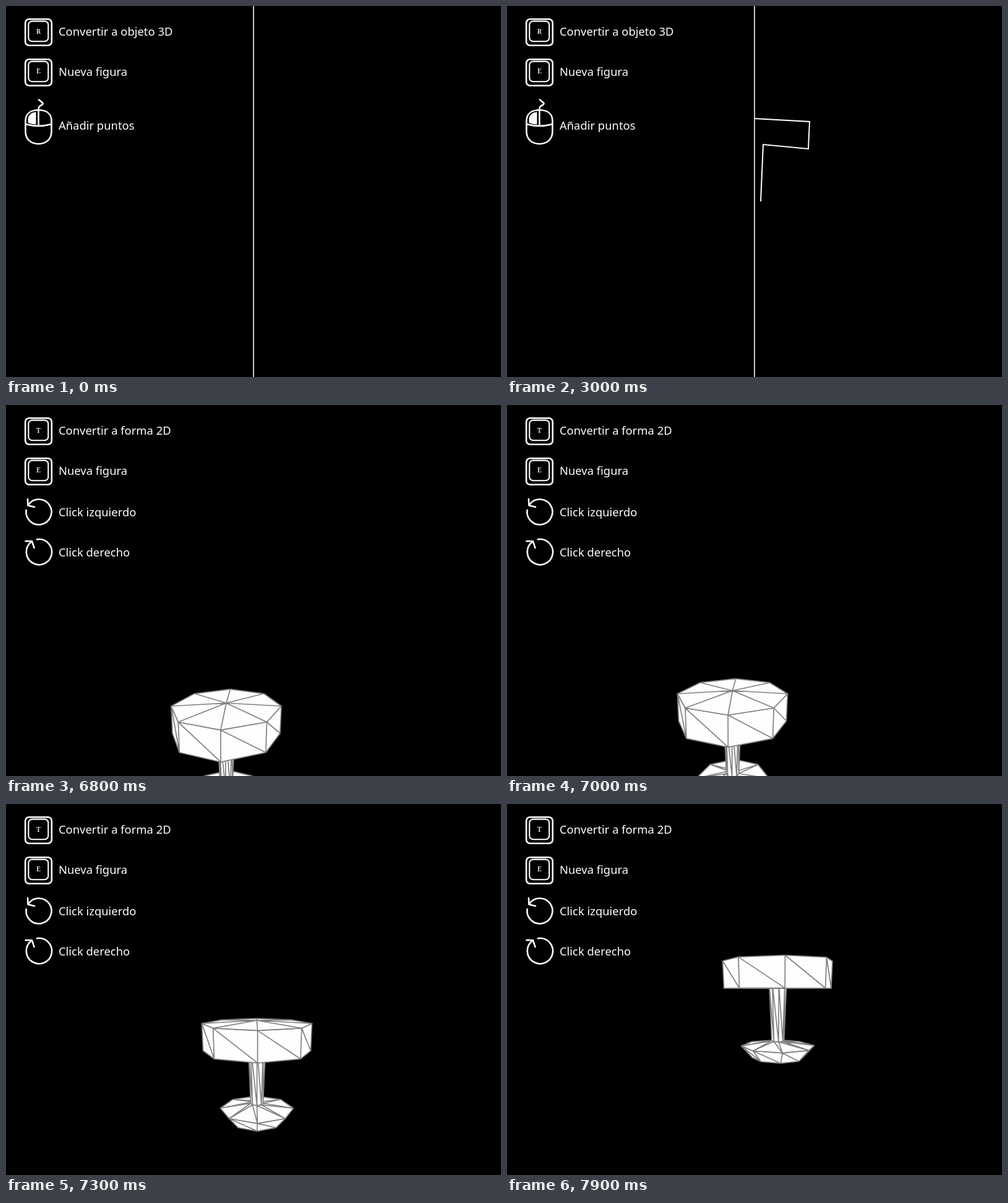
These frames come from a looping animation (800 by 600 pixels, 8000 ms). An HTML page with a canvas:

```html
<!DOCTYPE html>
<html lang="es">
<head>
<meta charset="utf-8">
<title>Sólido de revolución</title>
<style>
  html, body { margin: 0; width: 100%; height: 100%; overflow: hidden; background: #000; }
  svg, canvas { position: absolute; left: 0; top: 0; width: 800px; height: 600px; display: block; }
  text { fill: #fff; font: 18.4px "Noto Sans", sans-serif; }
  .letter { fill: #ddd; font: 600 10.5px "Noto Serif", serif; text-anchor: middle; }
  .icon, #outline { fill: none; stroke: #fff; }
  .icon { stroke-width: 2.6; stroke-linecap: round; stroke-linejoin: round; }
  #outline { stroke-width: 2; stroke-linejoin: miter; }
</style>
</head>
<body>
<canvas id="model" width="800" height="600"></canvas>
<svg viewBox="0 0 800 600">
  <defs>
    <g id="key" class="icon">
      <rect x="31.2" y="21.2" width="42.6" height="42.6" rx="6"/>
      <rect x="36.3" y="24.6" width="32" height="32.6" rx="6" stroke-width="2.1"/>
    </g>
  </defs>

  <use href="#key"/>
  <use href="#key" y="65"/>
  <text class="letter" x="52.5" y="109">E</text>
  <text x="85" y="113">Nueva figura</text>

  <g id="flat">
    <text class="letter" x="52.5" y="44.5">R</text>
    <text x="85" y="48">Convertir a objeto 3D</text>
    <text x="85" y="200">Añadir puntos</text>
    <g class="icon" stroke-width="3">
      <path d="M31.5 186C31.5 174 40 168.3 52.5 168.3S73.5 174 73.5 186V203C73.5 216 64 223 52.5 223S31.5 216 31.5 203Z"/>
      <path d="M31.5 191Q52.5 197 73.5 191M52.5 168V194M53 151.5L59.5 157Q60 159 56 161Q52 163 52.5 168"/>
      <path d="M36.5 188V183Q37.5 174 47.5 172.5V190.5Q41 190 36.5 188Z" fill="#fff" stroke-width="2"/>
    </g>
    <rect x="399" width="2" height="600" fill="#c8c8c8"/>
    <polyline id="outline"/>
  </g>

  <g id="solid">
    <text class="letter" x="52.5" y="44.5">T</text>
    <text x="85" y="48">Convertir a forma 2D</text>
    <text x="85" y="180">Click izquierdo</text>
    <text x="85" y="245">Click derecho</text>
    <path class="icon" d="M36.2 161.2A20.5 20.5 0 1 1 32.7 170M35 152L35.5 162.5L46 165"/>
    <path class="icon" d="M50 217.4A20.6 20.6 0 1 1 41 221.3M31.5 220.3L42 220.3L45.5 231"/>
  </g>
</svg>
<script>
  const LOOP = 8000, STEP = 100, SOLID_START = 6800, TURN_START = 7900;
  const SIDES = 8, EYE = 300 / Math.tan(Math.PI / 6);
  const $ = id => document.getElementById(id);
  const ctx = $('model').getContext('2d');

  // radius from the axis, height on the stage
  const profile = [[0, 182], [89, 187], [87, 231], [14, 224],
                   [10, 316], [59, 324], [41, 343], [0, 342]];
  // when each point of the profile is placed
  const clicks = [500, 500, 500, 2000, 3000, 3700, 4300, 5100];
  // time, axis x, vertical shift
  const path = [[6800, 356, 300], [6900, 358.5, 296], [7000, 364.5, 280],
                [7100, 378, 245], [7300, 405.5, 168], [7500, 422.5, 98],
                [7600, 427, 85], [7900, 437.8, 67]];

  function position(t) {
    const i = Math.min(path.findLastIndex(p => p[0] <= t), path.length - 2);
    const [a, b] = [path[i], path[i + 1]];
    const k = (t - a[0]) / (b[0] - a[0]);
    return [a[1] + (b[1] - a[1]) * k, a[2] + (b[2] - a[2]) * k];
  }

  function project(x, y, z) {
    const k = EYE / (EYE - z);
    return [400 + (x - 400) * k, 300 + (y - 300) * k];
  }

  const isFront = ([a, b, c]) =>
    (b[0] - a[0]) * (c[1] - a[1]) - (b[1] - a[1]) * (c[0] - a[0]) > 0.01;

  function trace(points) {
    points.forEach((p, i) => i ? ctx.lineTo(...p) : ctx.moveTo(...p));
    ctx.closePath();
  }

  function drawSolid(t) {
    const [cx, shift] = position(t);
    const turn = t >= TURN_START ? 0.036 : 0;
    const vertex = ([r, y], j) => {
      const angle = j * 2 * Math.PI / SIDES + turn;
      return project(cx + r * Math.sin(angle), y + shift, r * Math.cos(angle));
    };
    ctx.fillStyle = '#fefefe';
    ctx.strokeStyle = '#808080';
    ctx.lineWidth = 1.7;
    ctx.lineJoin = 'round';

    // seen from above, so rings are painted upwards
    for (let i = profile.length - 2; i >= 0; i--) {
      ctx.beginPath();
      for (let j = 0; j < SIDES; j++) {
        const a = vertex(profile[i], j), b = vertex(profile[i], j + 1);
        const c = vertex(profile[i + 1], j + 1), d = vertex(profile[i + 1], j);
        [[a, b, c], [a, c, d]].filter(isFront).forEach(trace);
      }
      ctx.fill();
      ctx.stroke();
    }
  }

  function drawOutline(t) {
    const placed = profile.filter((_, i) => clicks[i] <= t);
    $('outline').setAttribute('points', placed.map(([r, y]) => [400 + r, y]).join(' '));
  }

  function frame() {
    const t = Math.floor(performance.now() % LOOP / STEP) * STEP;
    const solid = t >= SOLID_START;
    $('flat').style.display = solid ? 'none' : '';
    $('solid').style.display = solid ? '' : 'none';
    ctx.clearRect(0, 0, 800, 600);
    if (solid) drawSolid(t); else drawOutline(t);
    requestAnimationFrame(frame);
  }
  frame();
</script>
</body>
</html>
```
